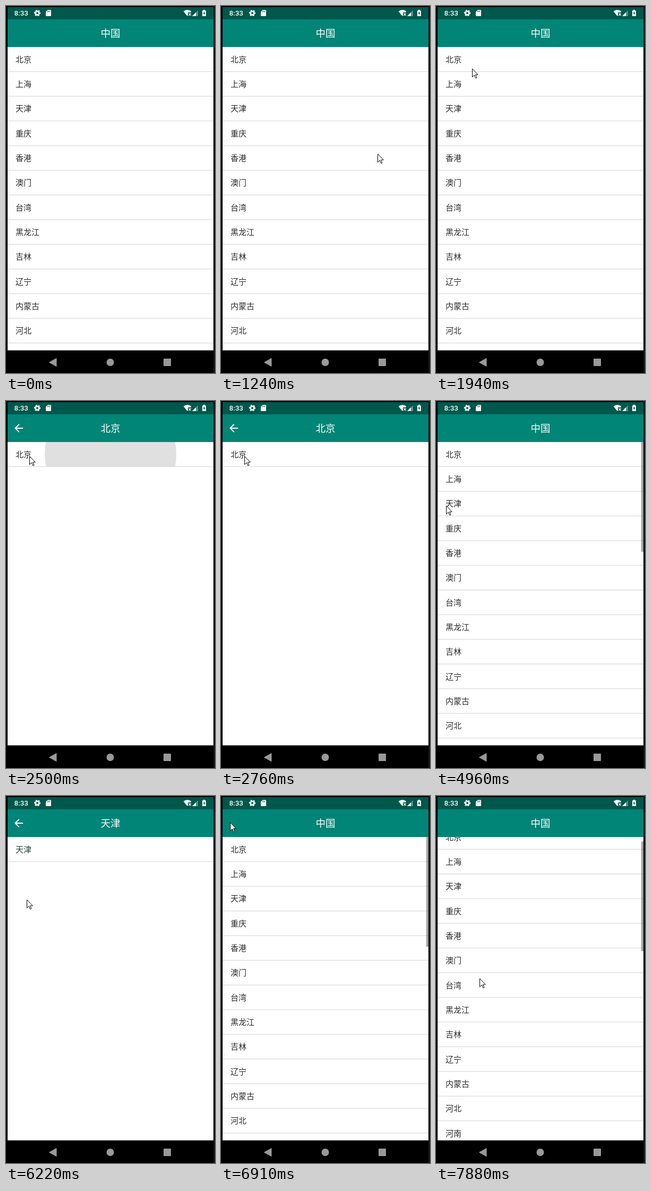
An HTML page that plays this animation: 394 by 689 pixels, repeating every 8 s.

```html
<!DOCTYPE html>
<html lang="zh-CN">
<head>
<meta charset="utf-8">
<title>地区列表</title>
<style>
  html, body { margin: 0; width: 100%; height: 100%; overflow: hidden; background: #000; }
  svg { display: block; }
  text { font-family: "Noto Sans CJK SC", "Noto Sans CJK", sans-serif; }
  .item { font-size: 15px; fill: #2a2a2a; }
  .title { font-size: 18.5px; fill: #fff; text-anchor: middle; }
  .clock { font: 500 13.4px Roboto, sans-serif; fill: #fff; }
</style>
</head>
<body>
<svg id="stage" width="394" height="689" viewBox="0 0 394 689">
  <defs>
    <clipPath id="view"><rect x="3" y="77" width="388" height="569.5"/></clipPath>
    <clipPath id="cell"><rect id="cellBox" x="3" width="388" height="46.3"/></clipPath>
  </defs>
  <rect width="394" height="689"/>
  <rect x="391" width="3" height="689" fill="#15151a"/>
  <rect x="3" y="2" width="388" height="22.5" fill="#00574b"/>
  <rect x="3" y="24.5" width="388" height="52.5" fill="#008577"/>
  <rect x="3" y="77" width="388" height="569.5" fill="#fff"/>

  <g fill="#fff">
    <text class="clock" x="15.5" y="18">8:33</text>
    <g fill="none" stroke="#fff" transform="translate(59 13.2) rotate(-14)">
      <circle r="3.4" stroke-width="2.8"/>
      <circle r="5.2" stroke-width="2" stroke-dasharray="2.7 2.745"/>
    </g>
    <path d="M78.500 7.500H84a1 1 0 0 1 1 1V18a1 1 0 0 1-1 1H76a1 1 0 0 1-1-1V11z"/>
    <path d="M78.500 9v2.500M80.500 9v2.500M82.500 9v2.500" stroke="#00574b"/>
    <path d="M334.500 10Q342 4.500 349.500 10L348 12H343V17.500L342 19z"/>
    <path d="M344.500 13.500l4 4.500m0-4.500l-4 4.500" stroke="#fff" stroke-width="1.300"/>
    <path d="M351 19L362 8V19z" opacity=".35"/>
    <path d="M351 19L358 12V19z"/>
    <path d="M370 8.500h2V7h3v1.500h2V19h-7z"/>
    <path d="M374 10l-2.600 4.200h1.700V17l2.600-4.200h-1.700z" fill="#00574b"/>
  </g>

  <text id="title" class="title" x="197" y="58"></text>
  <path id="back" fill="#fff" transform="translate(12 39)"
    d="M20 11H7.830l5.590-5.590L12 4l-8 8 8 8 1.410-1.410L7.830 13H20z"/>

  <g clip-path="url(#view)">
    <g clip-path="url(#cell)"><circle id="ripple" fill="#e0e0e0"/></g>
    <g id="list"></g>
    <g id="detail"></g>
    <rect id="thumb" x="387" width="4" height="206" opacity=".36"/>
  </g>

  <g fill="#999">
    <path d="M81.500 669L95 661.500V676.500z" stroke="#999" stroke-linejoin="round"/>
    <circle cx="196.500" cy="669" r="7"/>
    <rect x="297" y="662" width="14" height="14" rx="1"/>
  </g>
  <path id="cursor" fill="#fff" stroke="#000"
    d="M.5 .8V16.300L4.200 12.800L6.800 18.500L9 17.500L6.500 12H11.300z"/>
</svg>

<script>
const LOOP = 8000, TOP = 77, ROW = 46.33;
const places = ['北京', '上海', '天津', '重庆', '香港', '澳门', '台湾',
  '黑龙江', '吉林', '辽宁', '内蒙古', '河北', '河南'];

// time, x, y; the pointer glides between entries
const path = [
  [1240, 295, 277], [1290, 289, 284], [1480, 218, 228], [1680, 136, 168],
  [1860, 82, 127], [2030, 53, 107], [2069, 53, 107], [2070, 49, 104],
  [2219, 49, 104], [2220, 44, 103], [3099, 44, 103], [3100, 43, 103],
  [3530, 43, 103], [3760, 31, 74], [4015, 23, 54], [4650, 23, 54],
  [4800, 21, 122], [4960, 19, 196], [5090, 24, 199], [5420, 39, 194],
  [6225, 39, 194], [6400, 32, 102], [6560, 24, 37], [6700, 17, 49],
  [7120, 17, 49], [7300, 62, 185], [7470, 101, 310], [7600, 82, 342]
];

// press and release of a row: press time, page time, return time, row, touch point
const visits = [
  { press: 2220, open: 2450, close: 4200, row: 0, x: 44, y: 103, ink: '#2a2a2a' },
  { press: 5530, open: 5580, close: 6800, row: 2, x: 39, y: 194, ink: '#23483d' }
];

const $ = id => document.getElementById(id);
const set = (el, attrs) => { for (const k in attrs) el.setAttribute(k, attrs[k]); };
const clamp = v => Math.min(1, Math.max(0, v));
const show = (el, on) => { el.style.display = on ? '' : 'none'; };

function add(parent, tag, attrs) {
  const el = document.createElementNS('http://www.w3.org/2000/svg', tag);
  set(el, attrs);
  return parent.appendChild(el);
}

function addRow(parent, i, name) {
  const y = TOP + i * ROW;
  add(parent, 'rect', { x: 3, y: y + ROW - 0.8, width: 388, height: 1.2, fill: '#dadada' });
  const label = add(parent, 'text', { class: 'item', x: 18, y: y + 28.8 });
  label.textContent = name;
  return label;
}

places.forEach((name, i) => addRow($('list'), i, name));
const detailLabel = addRow($('detail'), 0, '');

function pointerAt(t) {
  let i = path.findIndex(p => p[0] > t);
  if (i < 0) return path[path.length - 1].slice(1);
  const [t0, x0, y0] = path[i - 1], [t1, x1, y1] = path[i];
  const k = (t - t0) / (t1 - t0);
  return [Math.round(x0 + (x1 - x0) * k), Math.round(y0 + (y1 - y0) * k)];
}

function drawRipple(t) {
  const v = visits.find(v => t >= v.press && t < v.open + 310);
  show($('ripple'), v);
  if (!v) return;
  const age = t - v.open;
  if (age < 0) {
    set($('cellBox'), { y: TOP + v.row * ROW });
    set($('ripple'), { cx: v.x, cy: v.y, r: 12 * clamp((t - v.press) / 80), opacity: 1 });
  } else {
    set($('cellBox'), { y: TOP });
    set($('ripple'), {
      cx: 197, cy: 100, r: Math.min(196, 72 + age * 1.02),
      opacity: 1 - clamp((age - 110) / 200)
    });
  }
}

function draw(t) {
  const visit = visits.find(v => t >= v.open && t < v.close);
  const scroll = t >= 7880 ? 23 : 0;
  const name = visit ? places[visit.row] : '';

  $('title').textContent = name || '中国';
  detailLabel.textContent = name;
  if (visit) detailLabel.style.fill = visit.ink;
  show($('back'), visit);
  show($('detail'), visit);
  show($('list'), !visit);
  set($('list'), { transform: `translate(0 ${-scroll})` });

  show($('thumb'), !visit && t >= visits[0].close);
  set($('thumb'), { y: TOP + scroll * 0.362 });
  drawRipple(t);

  show($('cursor'), t >= path[0][0]);
  if (t >= path[0][0]) set($('cursor'), { transform: `translate(${pointerAt(t)})` });
}

const start = performance.now();
function tick() {
  draw((performance.now() - start) % LOOP);
  requestAnimationFrame(tick);
}
tick();
</script>
</body>
</html>
```
